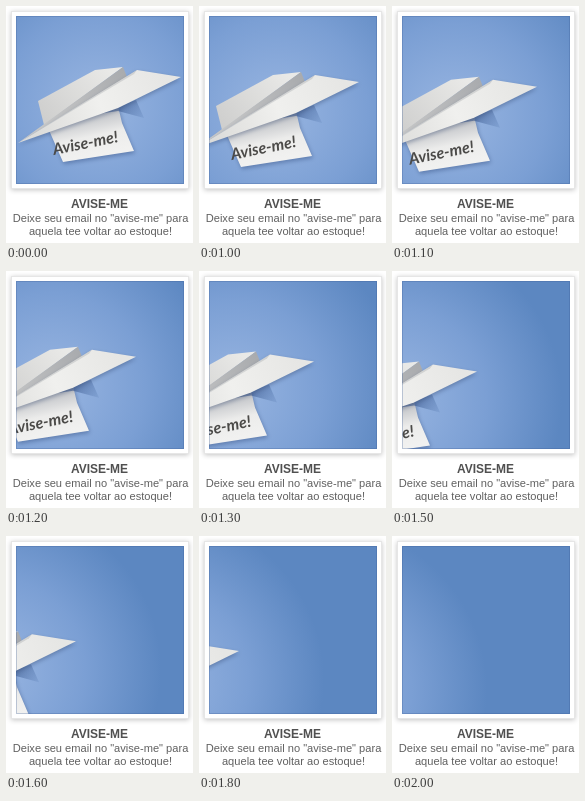
Recreate the animation shown at these times as an HTML page with a canvas. Size 187x237 px, loop 2100 ms.

```html
<!DOCTYPE html>
<html lang="pt-BR">
<head>
<meta charset="utf-8">
<title>Avise-me</title>
<style>
html, body { margin: 0; width: 100%; height: 100%; overflow: hidden; background: #fff; }
canvas { display: block; width: 187px; height: 237px; }
</style>
</head>
<body>
<canvas id="stage"></canvas>
<script>
const W = 187, H = 237;
const LOOP = 2100, HOLD = 1000, STEP = 100, STEPS = 11;
const DRIFT = { x: -15, y: 4.9 };
const PIC = { x: 10, y: 10, w: 168, h: 168 };

const canvas = document.getElementById('stage');
const ctx = canvas.getContext('2d');
const scale = window.devicePixelRatio || 1;
canvas.width = W * scale;
canvas.height = H * scale;

function ramp(x0, y0, x1, y1, ...colors) {
  const g = ctx.createLinearGradient(x0, y0, x1, y1);
  colors.forEach((c, i) => g.addColorStop(i / (colors.length - 1), c));
  return g;
}

function poly(points, fill) {
  ctx.beginPath();
  points.forEach(([x, y]) => ctx.lineTo(x, y));
  ctx.closePath();
  ctx.fillStyle = fill;
  ctx.fill();
}

function withShadow(color, blur, dx, dy, draw) {
  ctx.save();
  ctx.shadowColor = color;
  ctx.shadowBlur = blur * scale;
  ctx.shadowOffsetX = dx * scale;
  ctx.shadowOffsetY = dy * scale;
  draw();
  ctx.restore();
}

function label(text, y, font, color) {
  ctx.font = font + ' "Liberation Sans", Arial, sans-serif';
  ctx.fillStyle = color;
  ctx.fillText(text, 0, y);
}

function drawFrame() {
  ctx.fillStyle = '#fff';
  ctx.fillRect(0, 0, W, H);
  withShadow('rgba(0,0,0,.24)', 5, 0, 1, () => ctx.fillRect(5, 5, 178, 178));
  ctx.lineWidth = 1;
  ctx.strokeStyle = '#e6e6e6';
  ctx.strokeRect(5.5, 5.5, 177, 177);
}

// The light on the backdrop travels with the plane.
function drawSky(dx, dy) {
  const x = 92 + dx, y = 100 + dy;
  const g = ctx.createRadialGradient(x, y, 0, x, y, 168);
  g.addColorStop(0, '#98b5e1');
  g.addColorStop(0.55, '#7b9fd4');
  g.addColorStop(1, '#5c87c1');
  ctx.fillStyle = g;
  ctx.fillRect(PIC.x, PIC.y, PIC.w, PIC.h);
}

function drawEdge() {
  ctx.strokeStyle = 'rgba(60,95,150,.3)';
  ctx.lineWidth = 1;
  ctx.strokeRect(PIC.x + 0.5, PIC.y + 0.5, PIC.w - 1, PIC.h - 1);
}

function drawNote() {
  withShadow('rgba(35,60,110,.4)', 4, 1, 2, () =>
    poly([[42, 122], [112, 100], [116, 117], [128, 145], [57, 156]],
      ramp(78, 112, 86, 150, '#c3c5c9', '#ececeb', '#f1f1f0')));
  ctx.save();
  ctx.translate(48, 149);
  ctx.rotate(-0.2);
  ctx.font = 'italic bold 16px Lato, sans-serif';
  ctx.textAlign = 'left';
  ctx.fillStyle = '#4b4a48';
  ctx.fillText('Avise-me!', 0, 0);
  ctx.restore();
}

function drawPlane() {
  const nose = [12, 137];
  // shade cast below the near wing
  poly([[92, 108], [130, 94], [138, 112], [112, 105]],
    ramp(118, 98, 136, 112, 'rgba(62,92,145,.6)', 'rgba(80,115,170,.2)'));
  // far wing
  poly([[32, 95], [89, 64], [117, 61], [38, 119]],
    ramp(38, 112, 100, 60, '#cfcfce', '#e9e9e7'));
  // fold
  poly([nose, [117, 61], [121, 71]],
    ramp(12, 137, 119, 66, '#d2d2d1', '#a9abae'));
  // near wing
  withShadow('rgba(45,65,105,.4)', 4, 0, 2, () =>
    poly([nose, [131, 64], [175, 71], [112, 102]],
      ramp(30, 128, 160, 72, '#dcdcda', '#f0f0ee', '#e6e6e4')));
  // crease along the body
  poly([nose, [131, 64], [128, 68]], 'rgba(150,152,156,.3)');
}

function render(ms) {
  const t = ms % LOOP;
  const k = t < HOLD ? 0 : Math.min(STEPS, Math.floor((t - HOLD) / STEP) + 1);
  const dx = DRIFT.x * k, dy = DRIFT.y * k;
  ctx.setTransform(scale, 0, 0, scale, 0, 0);
  drawFrame();

  ctx.save();
  ctx.beginPath();
  ctx.rect(PIC.x, PIC.y, PIC.w, PIC.h);
  ctx.clip();
  drawSky(dx, dy);
  if (k < STEPS) {
    ctx.save();
    ctx.translate(dx, dy);
    drawNote();
    drawPlane();
    ctx.restore();
  }
  drawEdge();
  ctx.restore();

  ctx.save();
  ctx.textAlign = 'center';
  ctx.translate(W / 2, 0);
  label('AVISE-ME', 202, 'bold 12px', '#505050');
  ctx.translate(1, 0);
  label('Deixe seu email no "avise-me" para', 216, '11.1px', '#606060');
  label('aquela tee voltar ao estoque!', 229, '11.1px', '#606060');
  ctx.restore();
}

const start = performance.now();
function tick(now) {
  render(Math.max(0, now - start));
  requestAnimationFrame(tick);
}
render(0);
requestAnimationFrame(tick);
</script>
</body>
</html>
```
